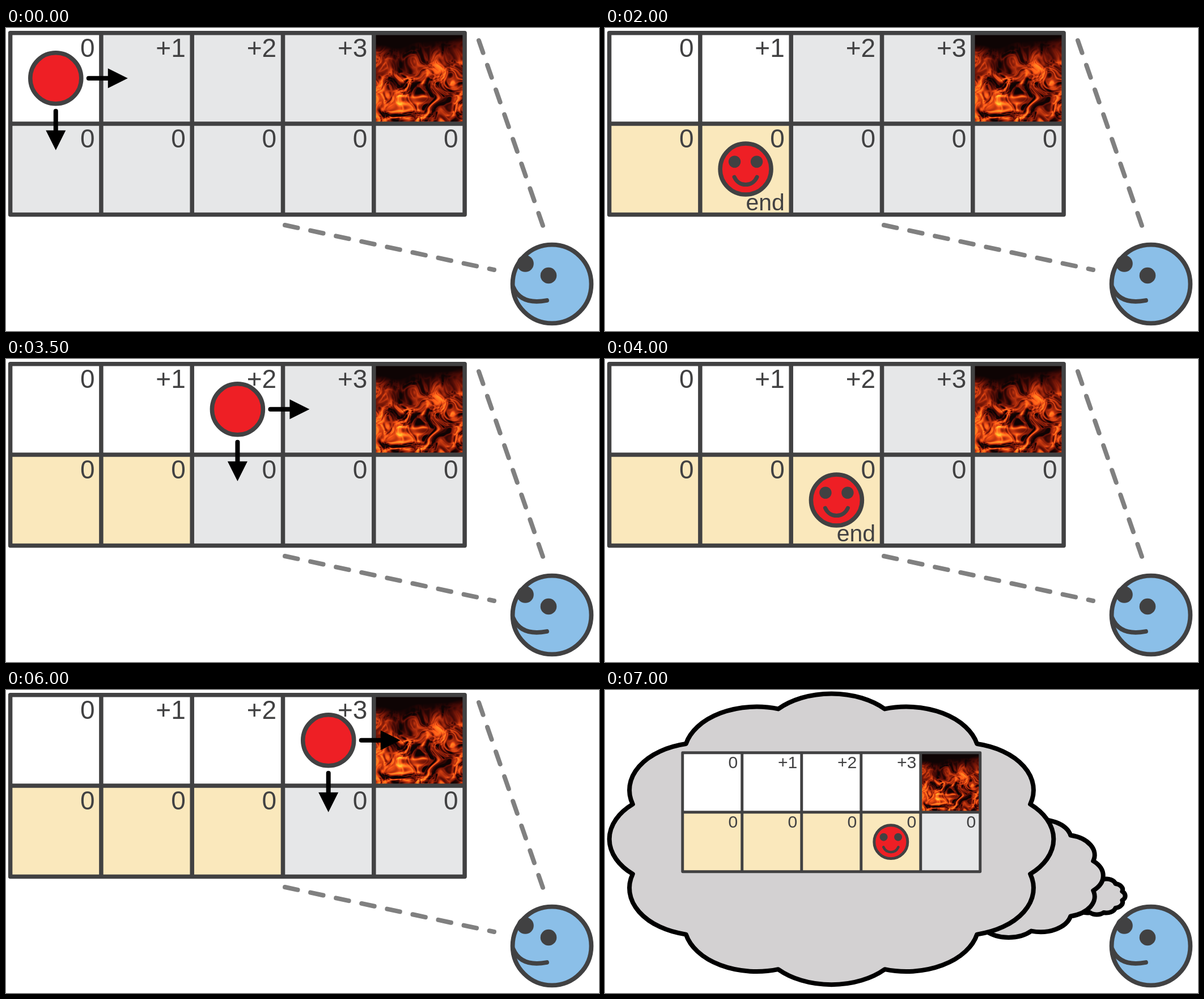
These frames come from a looping animation (1046 px wide and 535 px high, 8000 ms). An HTML page with a canvas:

```html
<!DOCTYPE html>
<html lang="en">
<head>
<meta charset="utf-8">
<title>Grid world agent</title>
<style>
html, body { margin: 0; width: 100%; height: 100%; overflow: hidden; background: #fff; }
canvas { display: block; width: 1046px; height: 535px; }
</style>
</head>
<body>
<canvas width="1046" height="535"></canvas>
<script>
const ctx = document.querySelector('canvas').getContext('2d');
const LOOP = 8000, STEP = 500;
const INK = '#414142', RED = '#ee1f25', BLUE = '#8bbfe8';
const GREY = '#e6e7e8', YELLOW = '#fae8bc', CLOUD = '#d3d1d2';
const CELL = 160.3, LEFT = 7.6, TOP = 8.8, COLS = 5;
const FIRE_COL = COLS - 1;

// Each episode walks right one cell further, then steps down and ends.
const path = [];
for (let last = 0; last < FIRE_COL; last++) {
  for (let col = 0; col <= last; col++) path.push([col, 0]);
  path.push([last, 1]);
}

function disc(x, y, r, fill, lineWidth = 0) {
  ctx.beginPath();
  ctx.arc(x, y, r, 0, 2 * Math.PI);
  ctx.fillStyle = fill;
  ctx.fill();
  if (lineWidth) {
    ctx.lineWidth = lineWidth;
    ctx.strokeStyle = INK;
    ctx.stroke();
  }
}

function stroke(d, color, width, dash = []) {
  ctx.strokeStyle = color;
  ctx.lineWidth = width;
  ctx.lineCap = ctx.lineJoin = 'round';
  ctx.setLineDash(dash);
  ctx.stroke(new Path2D(d));
  ctx.setLineDash([]);
}

function label(text, x, y, size) {
  ctx.font = `${size}px "Liberation Sans", Arial, sans-serif`;
  ctx.textAlign = 'right';
  ctx.fillStyle = INK;
  ctx.fillText(text, x, y);
}

function hash(x, y) {
  const s = Math.sin(x * 127.1 + y * 311.7) * 43758.5453;
  return s - Math.floor(s);
}

function noise(x, y) {
  const ix = Math.floor(x), iy = Math.floor(y);
  const ease = t => t * t * (3 - 2 * t);
  const mix = (a, b, t) => a + (b - a) * t;
  const u = ease(x - ix), v = ease(y - iy);
  return mix(mix(hash(ix, iy), hash(ix + 1, iy), u),
    mix(hash(ix, iy + 1), hash(ix + 1, iy + 1), u), v);
}

// Warped ridge noise: glowing tongues that fade into black at the top.
function fireHeat(x, y) {
  const wx = x + 0.22 * (noise(x * 7, y * 7) - 0.5);
  const wy = y + 0.3 * (noise(x * 7 + 40, y * 7) - 0.5);
  const ridge = (scale, seed) =>
    1 - Math.abs(2 * noise(wx * scale + seed, wy * scale * 0.8) - 1);
  const tongues = 0.5 * ridge(7, 3) + 0.3 * ridge(15, 19) + 0.25 * ridge(32, 57);
  const patches = noise(x * 4 + 11, y * 4 + 5);
  const rise = Math.min(1, Math.max(0, (y - 0.1 + 0.25 * (patches - 0.5)) * 2.6));
  const heat = (tongues - 0.38) * 1.35 + 0.35 * (patches - 0.5) + 0.12 * (0.5 - x);
  return Math.min(1, Math.max(0, heat * rise));
}

function makeFire(size) {
  const canvas = document.createElement('canvas');
  canvas.width = canvas.height = size;
  const g = canvas.getContext('2d');
  const image = g.createImageData(size, size);
  for (let i = 0; i < size * size; i++) {
    const heat = fireHeat((i % size) / size, Math.floor(i / size) / size);
    image.data.set([14 + 400 * heat, 4 + 215 * heat ** 1.8, 4 + 55 * heat ** 2, 255], i * 4);
  }
  g.putImageData(image, 0, 0);
  return canvas;
}
const fire = makeFire(154);

function grid(visited) {
  for (let row = 0; row < 2; row++) {
    for (let col = 0; col < COLS; col++) {
      const x = LEFT + col * CELL, y = TOP + row * CELL;
      if (!row && col === FIRE_COL) {
        ctx.drawImage(fire, x + 3.2, y + 3.2, 154, 154);
        continue;
      }
      const seen = visited.some(([c, r]) => c === col && r === row);
      ctx.fillStyle = !seen ? GREY : row ? YELLOW : '#fff';
      ctx.fillRect(x, y, CELL, CELL);
      label(row || !col ? '0' : '+' + col, x + 148.9, y + 42, 46);
    }
  }
  const w = COLS * CELL, h = 2 * CELL;
  let lines = `M${LEFT} ${TOP}h${w}v${h}h${-w}zM${LEFT} ${TOP + CELL}h${w}`;
  for (let col = 1; col < COLS; col++) lines += `M${LEFT + col * CELL} ${TOP}v${h}`;
  stroke(lines, INK, 7.5);
}

function arrow(x, y, angle) {
  ctx.save();
  ctx.translate(x, y);
  ctx.rotate(angle);
  stroke('M58 0H96', '#000', 8);
  ctx.fillStyle = '#000';
  ctx.fill(new Path2D('M92 -17.5L127 0L92 17.5Z'));
  ctx.restore();
}

function agent(col, row, showEnd) {
  const x = 87.8 + col * CELL, y = 88.8 + row * CELL;
  disc(x, y, 45, RED, 7.5);
  if (!row) {
    arrow(x, y, 0);
    arrow(x, y, Math.PI / 2);
    return;
  }
  disc(x - 19.5, y - 13, 10.7, INK);
  disc(x + 19.5, y - 13, 10.7, INK);
  stroke(`M${x - 20} ${y + 14}C${x - 12} ${y + 32} ${x + 12} ${y + 32} ${x + 20} ${y + 14}`, INK, 7);
  if (showEnd) label('end', x + 68.7, y + 73.2, 41);
}

function observer() {
  disc(963, 452, 69.4, BLUE, 7.8);
  disc(916, 416, 14.8, INK);
  disc(957, 437, 14.3, INK);
  stroke('M894.5 457C905 482 928 486 954 481', INK, 7.8);
}

// Twelve equal bumps on an ellipse; rx and ry pass through the cusps.
function cloud(cx, cy, rx, ry) {
  const bump = 0.352;
  let d = '';
  for (let i = 0; i <= 12; i++) {
    const a = (15 + 30 * i) * Math.PI / 180;
    const point = `${cx + rx * Math.cos(a)} ${cy + ry * Math.sin(a)}`;
    d += i ? `A${rx * bump} ${ry * bump} 0 0 1 ${point}` : `M${point}`;
  }
  d += 'Z';
  ctx.fillStyle = CLOUD;
  ctx.fill(new Path2D(d));
  stroke(d, '#000', 8);
}

function draw(time) {
  const step = Math.floor(time / STEP);
  const thinking = step >= path.length;
  const visited = path.slice(0, step + 1);
  const [col, row] = visited[visited.length - 1];

  ctx.fillStyle = '#fff';
  ctx.fillRect(0, 0, 1046, 535);
  ctx.save();
  if (thinking) {
    cloud(867.5, 363.5, 46.5, 30.5);
    cloud(712, 328, 154.5, 101);
    cloud(399.5, 263.3, 363, 238);
    ctx.translate(131.8, 105);
    ctx.scale(0.655, 0.655);
  } else {
    stroke('M834 22L947 349', '#808080', 8, [23, 23.1]);
    stroke('M492 348L861 427', '#808080', 8, [23, 23.1]);
  }
  grid(visited);
  agent(col, row, !thinking);
  ctx.restore();
  observer();
}

const start = performance.now();
function tick() {
  draw((performance.now() - start) % LOOP);
  requestAnimationFrame(tick);
}
tick();
</script>
</body>
</html>
```
